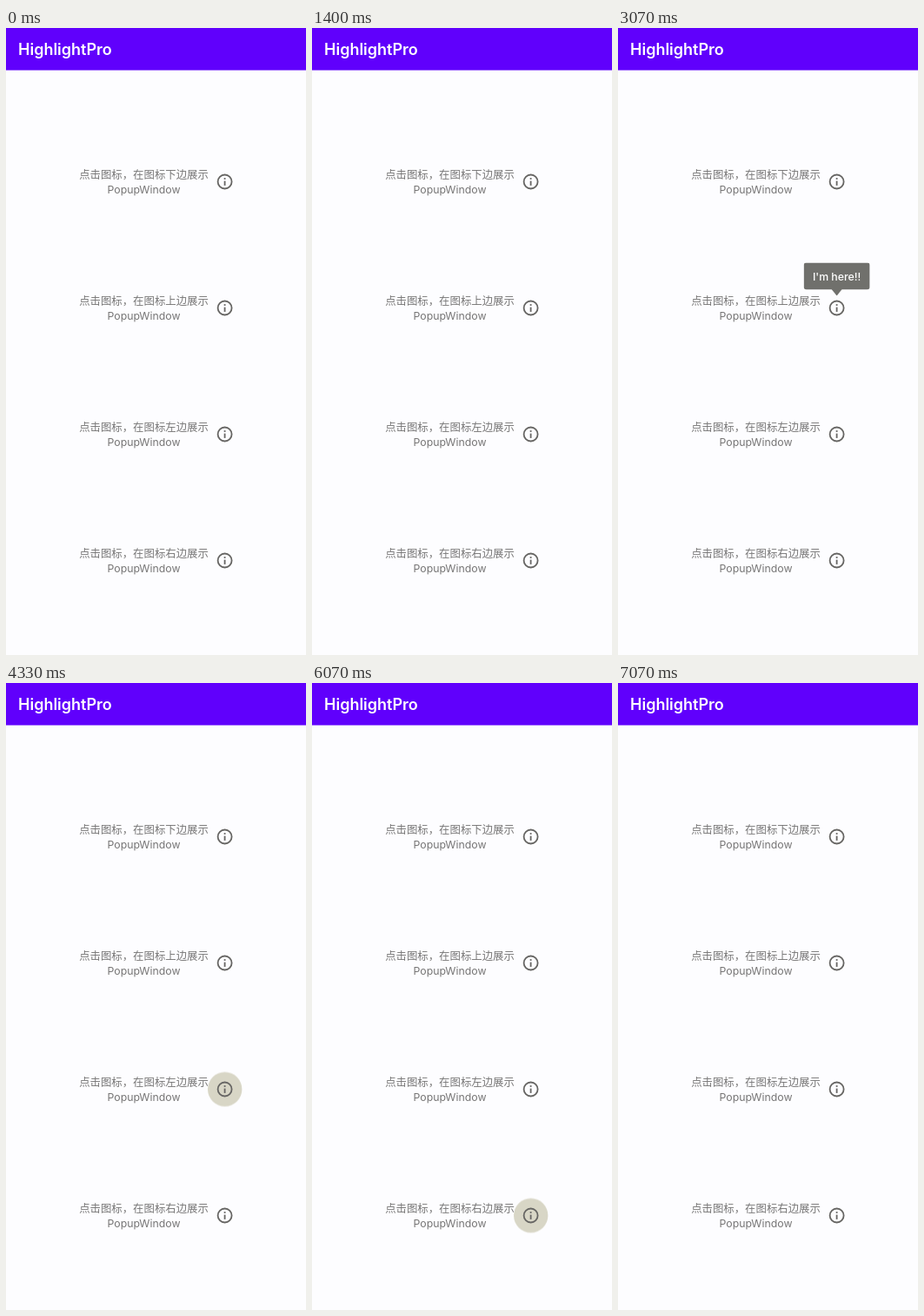
An HTML page that plays this animation: 345x720 px, repeating every 7.99 s.

```html
<!DOCTYPE html>
<html lang="zh">
<head>
<meta charset="utf-8">
<title>HighlightPro</title>
<style>
  html, body { margin: 0; width: 100%; height: 100%; overflow: hidden; background: #fdfdff; }
  svg { display: block; width: 345px; height: 720px; }
  text { font-family: Inter, "Noto Sans CJK SC", "Noto Sans CJK", sans-serif; }
  .title { font-size: 18px; font-weight: 600; fill: #fff; }
  .label { font-size: 12.4px; fill: #777676; text-anchor: middle; }
  .label .latin { font-size: 12.3px; }
  .popup { fill: #70706c; }
  .popup text { font-size: 12.3px; font-weight: 500; fill: #fff; text-anchor: middle; }
  .ripple { fill: #d8d6c6; }

  .ripple, .popup { opacity: 0; animation: 7990ms step-end infinite; }
  .r1 { animation-name: r1; }
  .r2 { animation-name: r2; }
  .r3 { animation-name: r3; }
  .r4 { animation-name: r4; }
  .p1 { animation-name: p1; }
  .p2 { animation-name: p2; }
  .p3 { animation-name: p3; }
  .p4 { animation-name: p4; }

  @keyframes r1 { 0%, 6.633% { opacity: 0 } 5.006% { opacity: 1 } }
  @keyframes r2 { 0%, 37.546% { opacity: 0 } 35.043% { opacity: 1 } }
  @keyframes r3 { 0%, 55.944% { opacity: 0 } 54.192% { opacity: 1 } }
  @keyframes r4 { 0%, 77.596% { opacity: 0 } 75.969% { opacity: 1 } }

  @keyframes p1 { 0%, 17.521% { opacity: 0 } 6.633% { opacity: .5 } 7.509% { opacity: 1 } }
  @keyframes p2 { 0%, 46.683% { opacity: 0 } 37.546% { opacity: .5 } 38.423% { opacity: 1 } }
  @keyframes p3 { 0%, 65.957% { opacity: 0 } 55.944% { opacity: 1 } }
  @keyframes p4 { 0%, 88.485% { opacity: 0 } 77.596% { opacity: .5 } 78.472% { opacity: 1 } }
</style>
</head>
<body>
<svg viewBox="0 0 345 720">
  <defs>
    <g id="info" fill="#666563">
      <circle r="8" fill="none" stroke="#666563" stroke-width="1.8"/>
      <rect x="-.9" y="-4.4" width="1.8" height="1.8"/>
      <rect x="-.9" y="-.9" width="1.8" height="5.3"/>
    </g>
    <g id="lines">
      <text y="-24.4">I'm here!!</text>
      <text y="-10">I'm here!!</text>
      <text y="4.4">I'm here!!</text>
      <text y="18.8">I'm here!!</text>
      <text y="33.2">I'm here!!</text>
    </g>
  </defs>

  <rect width="345" height="48.5" fill="#6000fc"/>
  <text class="title" x="14" y="31">HighlightPro</text>

  <g transform="translate(0 176.5)">
    <circle class="ripple r1" cx="251.7" r="19.7"/>
    <text class="label" x="158.5" y="-3.7">点击图标，在图标下边展示<tspan class="latin" x="158.5" y="13.3">PopupWindow</tspan></text>
    <use href="#info" x="251.6"/>
  </g>
  <g transform="translate(0 321.5)">
    <circle class="ripple r2" cx="251.7" r="19.7"/>
    <text class="label" x="158.5" y="-3.7">点击图标，在图标上边展示<tspan class="latin" x="158.5" y="13.3">PopupWindow</tspan></text>
    <use href="#info" x="251.6"/>
  </g>
  <g transform="translate(0 466.5)">
    <circle class="ripple r3" cx="251.7" r="19.7"/>
    <text class="label" x="158.5" y="-3.7">点击图标，在图标左边展示<tspan class="latin" x="158.5" y="13.3">PopupWindow</tspan></text>
    <use href="#info" x="251.6"/>
  </g>
  <g transform="translate(0 611.5)">
    <circle class="ripple r4" cx="251.7" r="19.7"/>
    <text class="label" x="158.5" y="-3.7">点击图标，在图标右边展示<tspan class="latin" x="158.5" y="13.3">PopupWindow</tspan></text>
    <use href="#info" x="251.6"/>
  </g>

  <!-- each popup is placed by the tip of its arrow -->
  <g transform="translate(251.6 191)">
    <g class="popup p1">
      <path d="M0 0L6 7.5H-6Z"/>
      <rect x="-38" y="7.3" width="76" height="30.7" rx="3"/>
      <text y="27.2">I'm here!!</text>
    </g>
  </g>
  <g transform="translate(251.6 307.5)">
    <g class="popup p2">
      <path d="M0 0L6 -7.5H-6Z"/>
      <rect x="-38" y="-38" width="76" height="30.7" rx="3"/>
      <text y="-17.7">I'm here!!</text>
    </g>
  </g>
  <g transform="translate(238 466.5)">
    <g class="popup p3">
      <path d="M0 0L-7.7 -6V6Z"/>
      <rect x="-83.5" y="-43.3" width="76" height="86.6" rx="3"/>
      <use href="#lines" x="-45.5"/>
    </g>
  </g>
  <g transform="translate(258.3 611.5)">
    <g class="popup p4">
      <path d="M0 0L7.7 -6V6Z"/>
      <rect x="7.5" y="-43.3" width="76" height="86.6" rx="3"/>
      <use href="#lines" x="45.5"/>
    </g>
  </g>
</svg>
</body>
</html>
```
